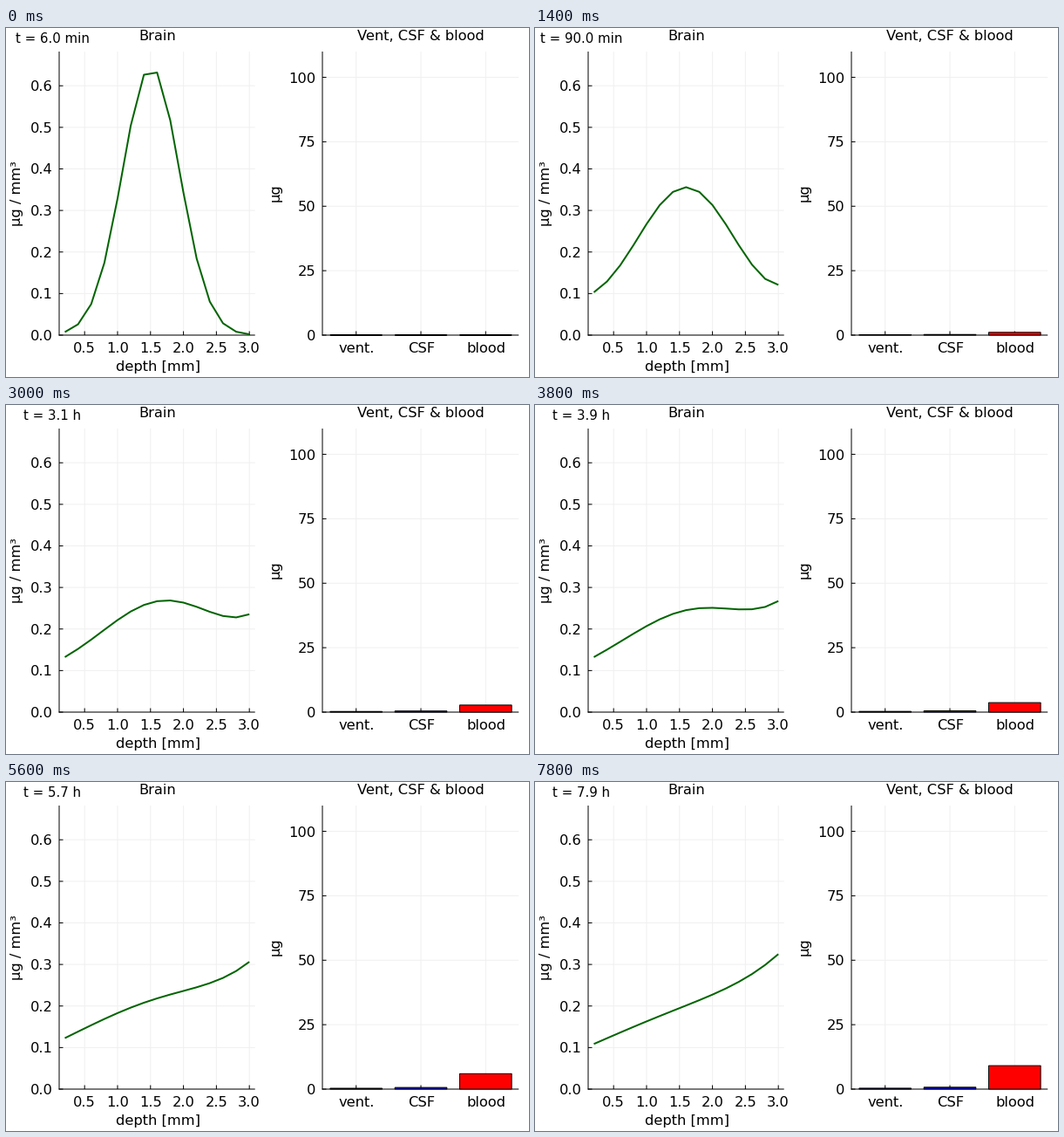
These frames come from a looping animation (600 px wide and 400 px high, 8 s). A matplotlib script:

```python
import numpy as np
import matplotlib.pyplot as plt
from matplotlib.animation import FuncAnimation
from matplotlib.patches import Rectangle

FRAMES, STEP_MS, STEP_MIN, START_MIN = 40, 200, 12, 6
PX = 0.72                      # points per pixel at 100 dpi
TOP, BASE = 27, 352            # plot area, in pixels from the top
DX = 0.2
DEPTH = np.arange(1, 16) * DX
TIMES = START_MIN + STEP_MIN * np.arange(FRAMES)


def simulate(diff=0.00252, drift=0.00114, leak=0.00053, decay=2e-4):
    """Drift and diffusion of a Gaussian dose, leaking at the shallow end."""
    c = 0.646 * np.exp(-(DEPTH - 1.508) ** 2 / 0.382)
    states = [c]
    for _ in TIMES[1:]:
        for _ in range(STEP_MIN):
            inner = drift * (c[1:] + c[:-1]) / 2 - diff * np.diff(c) / DX
            flux = np.concatenate([[-leak * c[0]], inner, [0]])
            c = c - np.diff(flux) / DX - decay * c
        states.append(c)
    return states


def amounts(t):
    """Drug in ventricle, CSF and blood after t minutes."""
    return (0.38 * (1 - np.exp(-t / 170)),
            0.9 * (1 - np.exp(-t / 280)),
            9.1 * (t / 474) ** 1.283)


profiles = simulate()

fig = plt.figure(figsize=(6, 4), dpi=100, facecolor="white")
ax = fig.add_axes([0, 0, 1, 1])
ax.set(xlim=(0, 600), ylim=(400, 0))
ax.axis("off")


def depth_x(d):
    return 67.5 + (d - DX) * 75.6


def conc_y(c):
    return BASE - c * 476.3


def mass_y(m):
    return BASE - m * (BASE - TOP) / 110


def label(x, y, s, size=16.3, ha="center", **kw):
    return ax.text(x, y, s, fontsize=size * PX, family="DejaVu Sans", ha=ha,
                   va="baseline", color="black", **kw)


def stroke(xs, ys, color="black", z=2):
    ax.plot(xs, ys, color=color, lw=PX, solid_capstyle="butt", zorder=z,
            snap=False)


def panel(left, right, title, ylabel, ylabel_xy, xticks, yticks, shift=0):
    for x, name in xticks:
        stroke([x, x], [TOP, BASE], "#f0f0f0", 1)
        stroke([x, x], [BASE - 4.5, BASE])
        label(x + shift, 372.2, name)
    for y, name in yticks:
        stroke([left, right], [y, y], "#f0f0f0", 1)
        stroke([left, left + 4.5], [y, y])
        label(left - 7.3, y + 6, name, ha="right")
    stroke([left, left], [TOP, BASE + 0.5])
    stroke([left - 0.5, right], [BASE, BASE])
    label((left + right) / 2 + 0.4, 14.3, title)
    label(*ylabel_xy, ylabel, rotation=90, rotation_mode="anchor")


bar_x = [401.7 + 74.3 * k for k in range(3)]
panel(61, 285.7, "Brain", "µg / mm³", (17, 190),
      [(depth_x(d), f"{d:.1f}") for d in np.arange(0.5, 3.1, 0.5)],
      [(conc_y(c), f"{c:.1f}") for c in np.arange(7) / 10])
panel(363, 588.2, "Vent, CSF & blood", "µg", (314, 189),
      list(zip(bar_x, ["vent.", "CSF", "blood"])),
      [(mass_y(m), str(m)) for m in range(0, 101, 25)], shift=0.6)
label(174, 393.3, "depth [mm]")

clock = label(53.5, 17, "", size=15)
curve, = ax.plot([], [], color="darkgreen", lw=2 * PX, zorder=3,
                 solid_joinstyle="round", solid_capstyle="butt")
bars = []
for x, color in zip(bar_x, ["blue", "blue", "red"]):
    bar = Rectangle((x - 29.8, BASE), 59.6, 0, fc=color, ec="black",
                    lw=PX, zorder=3, snap=False)
    bars.append(ax.add_patch(bar))


def draw(i):
    t = TIMES[i]
    clock.set_text(f"t = {t:.1f} min" if t < 120 else f"t = {t / 60:.1f} h")
    curve.set_data(depth_x(DEPTH), conc_y(profiles[i]))
    for bar, m in zip(bars, amounts(t)):
        bar.set_height(mass_y(m) - BASE)
    return [clock, curve, *bars]


anim = FuncAnimation(fig, draw, frames=FRAMES, interval=STEP_MS,
                     repeat=True, repeat_delay=0)
plt.show()
```
